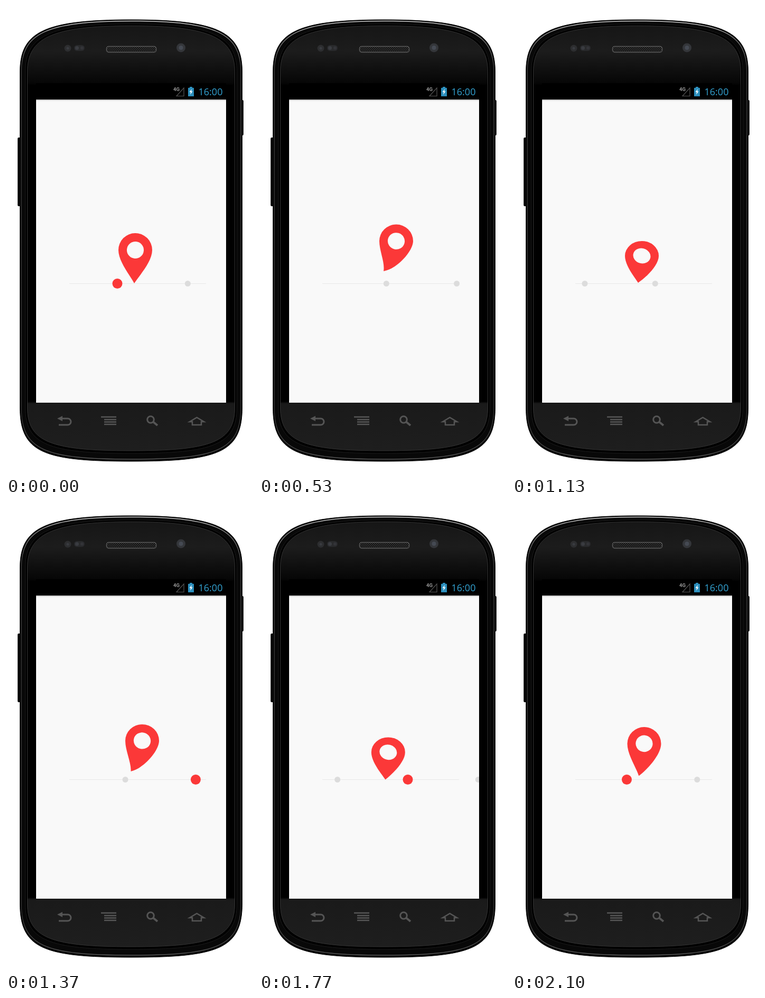
These frames come from a looping animation (468 by 886 pixels, 2130 ms). An HTML page:

```html
<!DOCTYPE html>
<html lang="en">
<head>
<meta charset="utf-8">
<title>Hopping pin</title>
<style>
  html, body { margin: 0; width: 100%; height: 100%; overflow: hidden; background: #fff; }
  svg { display: block; width: 468px; height: 886px; }
  .icon { fill: none; stroke: #555; stroke-width: 3; }
</style>
</head>
<body>
<svg viewBox="0 0 468 886">
  <defs>
    <linearGradient id="gloss" x1="0" y1="0" x2="0" y2="1">
      <stop offset="0" stop-color="#ccc"/>
      <stop offset=".03" stop-color="#888"/>
      <stop offset=".1" stop-color="#383838"/>
      <stop offset=".9" stop-color="#2c2c2c"/>
      <stop offset="1" stop-color="#555"/>
    </linearGradient>
    <linearGradient id="face" x1="0" y1="0" x2="0" y2="1">
      <stop offset="0" stop-color="#161616"/>
      <stop offset=".06" stop-color="#1c1c1c"/>
      <stop offset=".135" stop-color="#060606"/>
      <stop offset=".14" stop-color="#000"/>
      <stop offset=".884" stop-color="#000"/>
      <stop offset=".889" stop-color="#1a1a1a"/>
      <stop offset="1" stop-color="#1e1e1e"/>
    </linearGradient>
    <pattern id="mesh" width="4" height="4" patternUnits="userSpaceOnUse">
      <rect width="4" height="4" fill="#0c0c0c"/>
      <circle cx="1" cy="1" r=".9" fill="#4a4a4a"/>
      <circle cx="3" cy="3" r=".9" fill="#4a4a4a"/>
    </pattern>
    <linearGradient id="shade" x1="0" y1="0" x2="0" y2="1">
      <stop offset="0" stop-color="#bbb"/>
      <stop offset="1" stop-color="#f9f9f9"/>
    </linearGradient>
    <clipPath id="screen"><rect x="57" y="177" width="360" height="574"/></clipPath>
  </defs>

  <rect x="22" y="249" width="8" height="130" rx="2" fill="#0a0a0a"/>
  <rect x="443" y="178" width="7" height="67" rx="2" fill="#0a0a0a"/>
  <g id="body"></g>

  <circle cx="117" cy="80" r="6.5" fill="#2d2e30"/>
  <circle cx="117" cy="80" r="2.5" fill="#393b40"/>
  <rect x="129" y="74" width="20" height="11" rx="5.5" fill="#292a2c"/>
  <circle cx="134.5" cy="79.5" r="3.5" fill="#393b40"/>
  <circle cx="144" cy="79.5" r="3" fill="#333438"/>
  <rect x="190.5" y="76.5" width="94" height="11" rx="4" fill="url(#mesh)" stroke="#5a5a5a" stroke-width="1.5"/>
  <circle cx="331.5" cy="79" r="8.5" fill="#34363a"/>
  <circle cx="331.5" cy="79" r="4" fill="#454a53"/>

  <rect x="57" y="146" width="360" height="31" fill="#000"/>
  <text x="317" y="161" font-family="Roboto, sans-serif" font-weight="700" font-size="9.5" fill="#999">4G</text>
  <path d="M323 170.5H337V155Z" fill="none" stroke="#555" stroke-width="1.2"/>
  <path d="M348 153h5v2h3v16h-11v-16h3z" fill="#2c8fbd"/>
  <path d="M352 157l-4.5 6h2.500l-1 5 4.500-6.500h-2.500z" fill="#fff"/>
  <text x="364.5" y="169" font-family="'Open Sans', 'Noto Sans', sans-serif" font-size="18" fill="#33a3d3">16:00</text>

  <rect x="57" y="177" width="360" height="574" fill="#f9f9f9"/>
  <rect x="57" y="177" width="360" height="3" fill="url(#shade)"/>
  <g clip-path="url(#screen)">
    <path d="M120 525.5H379" stroke="#e8e8e8"/>
    <g id="dots"></g>
    <path id="pin" fill="#fb3838" fill-rule="evenodd"/>
  </g>

  <g class="icon">
    <path d="M104 781H117a6 6 0 0 1 0 12H100"/>
    <path d="M97 781l10-5v10z" fill="#555" stroke="none"/>
    <path d="M180 778H209M186 783H209M186 787.5H209M186 792H209" stroke-width="2.5"/>
    <circle cx="274" cy="783" r="6.3"/>
    <path d="M279 787.5L287 794" stroke-width="4"/>
    <path d="M348 787L361.5 779L375 787H370V793H353V787Z" stroke-width="2.5"/>
  </g>
</svg>
<script>
const NS = 'http://www.w3.org/2000/svg';
const LOOP = 2130, STEP = 100 / 3, GAP = 400 / 3;

function add(parent, tag, attrs) {
  const el = document.createElementNS(NS, tag);
  for (const name in attrs) el.setAttribute(name, attrs[name]);
  return parent.appendChild(el);
}

// Phone outline, pulled in from the sides, with its own top and bottom.
function outline(inset, top, bottom) {
  const l = 26.5 + inset, r = 447.5 - inset, k = 44;
  const high = top + 24, low = bottom - 17;
  return `M${l} 760V125C${l} ${high} ${l + k} ${top} 237 ${top}S${r} ${high} ${r} 125V760` +
    `C${r} ${low} ${r - k} ${bottom} 237 ${bottom}S${l} ${low} ${l} 760Z`;
}

const body = document.getElementById('body');
[
  [0, 26, 862, '#050505', '#000', 1],
  [2.5, 28.5, 858, '#080808', 'url(#gloss)', 1.5],
  [10, 34, 847, '#000', '#1c1c1c', 1],
  [14, 37.5, 842, 'url(#face)', '#333', 1]
].forEach(([inset, top, bottom, fill, stroke, width]) =>
  add(body, 'path', { d: outline(inset, top, bottom), fill, stroke, 'stroke-width': width }));

// Every third dot is red.
const dots = [0, 1, 2, 3, 4].map(i => {
  const red = i % 3 === 0;
  const el = add(document.getElementById('dots'), 'circle',
    { cy: 525.5, r: red ? 9.5 : 5.5, fill: red ? '#fb3838' : '#dcdcdc' });
  return { el, red, start: 211 + i * GAP };
});

// Hop poses: distance, head x, head y, head height radius, tip x, tip y.
const poses = [
  [0, 245, 462, 32, 243, 525],
  [18, 243, 469, 31, 242, 525.5],
  [38, 243.5, 473, 28.5, 241, 525.5],
  [60, 244.7, 473.5, 28.3, 239.5, 525.5],
  [73, 246, 473, 28, 239, 524],
  [88, 253, 457, 30.5, 238, 514],
  [103, 260, 445, 31.5, 236, 502],
  [118.3, 258, 452, 31, 236.5, 510],
  [126.3, 251, 457, 31.3, 240, 518]
];

function poseAt(i) {
  const n = poses.length, turn = Math.floor(i / n), p = poses[i - turn * n];
  return [p[0] + turn * GAP, ...p.slice(1)];
}

// Smooth periodic curve through the poses.
function pose(p) {
  let i = poses.length - 1;
  while (poses[i][0] > p) i--;
  const [a, b, c, d] = [-1, 0, 1, 2].map(o => poseAt(i + o));
  const w = c[0] - b[0], u = (p - b[0]) / w, v = 1 - u;
  return b.slice(1).map((from, j) => {
    const q = j + 1, to = c[q];
    const m0 = w * (to - a[q]) / (c[0] - a[0]);
    const m1 = w * (d[q] - from) / (d[0] - b[0]);
    return v * v * (1 + 2 * u) * from + u * v * v * m0 + u * u * (3 - 2 * u) * to - u * u * v * m1;
  });
}

function pinPath([x, y, ry, tx, ty]) {
  const rx = 32, h = ty - y, lean = x - tx, squash = 32 - ry;
  const bend = tx + lean * .6, low = ty - h * .28, side = y + h * .33;
  const spread = 11 + squash * .7;
  const hx = 16 + squash * .15, hy = 16 - squash * .45;
  const tilt = Math.min(lean * 2.5, 15), turn = tilt * Math.PI / 180;
  const ox = hx * Math.cos(turn), oy = hx * Math.sin(turn);
  return `M${x - rx} ${y}A${rx} ${ry} 0 0 1 ${x + rx} ${y}` +
    `C${x + rx} ${side} ${bend + spread} ${low + Math.max(0, lean - 4) * .6} ${tx} ${ty}` +
    `C${bend - spread} ${low} ${x - rx} ${side} ${x - rx} ${y}Z` +
    `M${x - ox} ${y - oy}a${hx} ${hy} ${tilt} 1 0 ${2 * ox} ${2 * oy}` +
    `a${hx} ${hy} ${tilt} 1 0 ${-2 * ox} ${-2 * oy}Z`;
}

// The track runs steadily except for one short slow stretch.
function travel(k) {
  if (k <= 16) return k * 6.44;
  if (k <= 23) return 103 + (k - 16) * 4.63;
  return 135.4 + (k - 23) * 264.6 / 41;
}

const pin = document.getElementById('pin');

function draw(time) {
  const t = Math.floor(time % LOOP / 10) * 10;
  const s = travel(Math.floor((t + 5) / STEP));
  for (const { el, red, start } of dots) {
    const x = start - s;
    const shown = red ? x > 111 && x < 393 : x > 117.5 && x < 418;
    el.setAttribute('cx', x);
    el.setAttribute('visibility', shown ? 'visible' : 'hidden');
  }
  pin.setAttribute('d', pinPath(pose(s % GAP)));
}

const begin = performance.now();
function tick() {
  draw(performance.now() - begin);
  requestAnimationFrame(tick);
}
tick();
</script>
</body>
</html>
```
